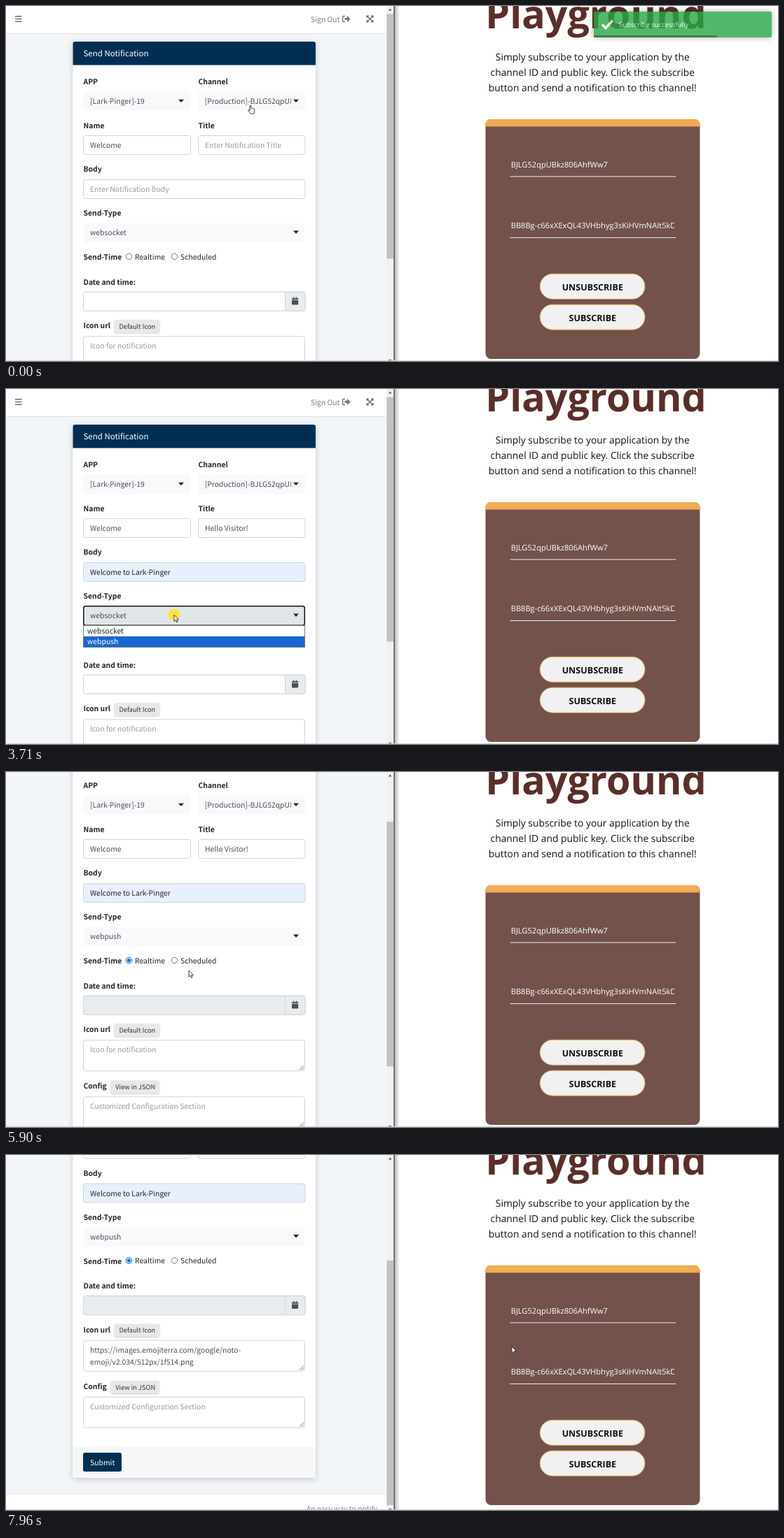
Recreate the animation shown at these times as an HTML page. Size 1102 by 508 pixels, loop 8 s.

```html
<!DOCTYPE html>
<html lang="en">
<head>
<meta charset="utf-8">
<title>Notification form</title>
<style>
  html, body { margin: 0; width: 100%; height: 100%; overflow: hidden; background: #fff; }
  svg { display: block; width: 1102px; height: 508px; }
  text {
    font: 10.4px "Noto Sans CJK JP", "Noto Sans CJK SC", "Noto Sans CJK", "Open Sans", sans-serif;
    fill: #495057; text-rendering: geometricPrecision; white-space: pre;
  }
  .label { font-weight: 700; fill: #212529; }
  .plain { fill: #212529; }
  .hint { fill: #939ba2; }
  .nav { fill: #7f7f7f; }
  .title { font-size: 11.5px; fill: #fff; }
  .white { fill: #fff; }
  .small { font-size: 9.25px; fill: #333; }
  .open, .item, .key, .head, .button, .toast { font-family: "Open Sans", "Noto Sans", sans-serif; }
  .open { font-size: 13.85px; fill: #111; text-anchor: middle; }
  .item { font-size: 9.55px; fill: #333; }
  .key { font-size: 11.1px; font-weight: 500; fill: #fff; }
  .head { font-size: 55.6px; font-weight: 700; fill: #5a2e2a; text-anchor: middle; }
  .button { font-size: 12.55px; font-weight: 700; fill: #111; text-anchor: middle; }
  .toast { font-size: 9.6px; fill: #fff; }
</style>
</head>
<body>
<svg id="stage" viewBox="0 0 1102 508" xmlns="http://www.w3.org/2000/svg"></svg>
<script>
const LOOP = 8000;
const BRAND = 'Lark-Pinger';
const GREETING = `Welcome to ${BRAND}`;
const $ = id => document.getElementById(id);

// Markup helpers
const text = (x, y, str, cls = '', extra = '') =>
  `<text x="${x}" y="${y}" class="${cls}" ${extra}>${str}</text>`;
const rect = (x, y, w, h, fill, extra = '') =>
  `<rect x="${x}" y="${y}" width="${w}" height="${h}" fill="${fill}" ${extra}/>`;
const line = (d, stroke, width = 1, extra = '') =>
  `<path d="${d}" fill="none" stroke="${stroke}" stroke-width="${width}" ${extra}/>`;
const shape = (d, fill, extra = '') => `<path d="${d}" fill="${fill}" ${extra}/>`;
const group = (id, body, extra = '') => `<g id="${id}" ${extra}>${body}</g>`;
const field = (x, y, w, h = 27, extra = '') =>
  rect(x + .5, y + .5, w - 1, h, '#fff', `stroke="#ced4da" rx="3" ${extra}`);
const select = (x, y, w, extra = '') => rect(x, y, w, 27.5, '#f8f9fa', `rx="3" ${extra}`);
const caret = (x, y) => shape(`M${x} ${y}h8l-4 4.3z`, '#212529');
const radio = x => `<circle cx="${x}" cy="358.5" r="4.2" fill="#fff" stroke="#767676"/>`;
const chip = (x, y, w, str) =>
  rect(x, y, w, 18, '#e8e8e8', 'rx="2" filter="url(#soft)"') + text(x + 6.7, y + 12.6, str, 'small');
const textarea = y => field(110, y, 317, 44) +
  line(`M419 ${y + 43}l6 -6M422.5 ${y + 43}l2.5 -2.5`, '#555', .9);

const icons = group('icons',
  line('M13 14.8h9.5M13 18.5h9.5M13 22.2h9.5', '#6f6f6f', 1.5) +
  line('M484 14.4h-2.4q-1 0-1 1v6q0 1 1 1h2.4', '#777', 1.5) +
  shape('M483.5 16.8h3.5v-3l4.6 4.6-4.6 4.6v-3h-3.5z', '#777') +
  line('M516 15l7 7M523 15l-7 7', '#666', 1.4) +
  shape('M514.5 13.5h4l-4 4zM524.5 13.5h-4l4 4zM514.5 23.5h4l-4-4zM524.5 23.5h-4l4-4z', '#666'));

const calendar = shape('M408 418.2h2v-1.6h1.4v1.6h2.4v-1.6h1.4v1.6h2v2h-9.2z' +
  'M408 421h9.2v5.4q0 1-1 1h-7.2q-1 0-1-1z', '#495057');

const form =
  rect(0, 0, 543, 39, '#fff') + line('M0 39.5H543', '#dee2e6') + icons +
  text(435, 22.6, 'Sign Out', 'nav') +
  rect(95.5, 51, 346.5, 618.5, '#fff', 'rx="3" filter="url(#cardShadow)"') +
  shape('M95.5 84.5V54q0-3 3-3H439q3 0 3 3V84.5z', '#002f54') +
  text(110.5, 71.6, 'Send Notification', 'title') +
  text(110.5, 112, 'APP', 'label') + text(274.5, 112, 'Channel', 'label') +
  select(110, 122.3, 153) + text(120, 140, `[${BRAND}]-19`) + caret(246, 133.7) +
  select(274, 122.3, 153) +
  text(283.7, 140, '[Production]-BJLG52qpUBkz', '', 'clip-path="url(#channelClip)"') + caret(410, 133.7) +
  text(110.5, 174.6, 'Name', 'label') + text(274.5, 174.6, 'Title', 'label') +
  field(110, 185, 154) + text(120, 203, 'Welcome') +
  field(274, 185, 153.5, 27, 'id="titleBox"') + text(284, 203, '', '', 'id="titleText"') +
  line('M284.5 192v14', '#222', .9, 'id="titleCaret"') +
  text(110.5, 237.4, 'Body', 'label') +
  field(110, 248, 317.5, 27, 'id="bodyBox"') + text(120, 266, '', '', 'id="bodyText"') +
  line('M120.5 255v14', '#222', .9, 'id="bodyCaret"') +
  text(110.5, 300, 'Send-Type', 'label') +
  select(110.8, 310.8, 315.5, 'id="typeBox"') +
  text(120, 328.4, '', '', 'id="typeText"') + caret(410, 321.6) +
  text(110.5, 363.2, 'Send-Time', 'label') + radio(175.5) + radio(240.5) +
  group('picked', '<circle cx="175.5" cy="358.5" r="4.2" fill="#fff" stroke="#0b72d0"/>' +
    '<circle cx="175.5" cy="358.5" r="2.6" fill="#0b72d0"/>') +
  text(184, 362.6, 'Realtime', 'plain') + text(249, 362.6, 'Scheduled', 'plain') +
  text(110.5, 398.6, 'Date and time:', 'label') +
  field(110, 408.7, 317.5) + rect(398.5, 409.2, 28.5, 27, '#e9ecef', 'stroke="#ced4da" rx="2"') +
  rect(110.5, 409.2, 288, 27, '#fff', 'id="dateBox" stroke="#ced4da" rx="2"') + calendar +
  text(110.5, 461, 'Icon url', 'label') + chip(154.7, 449.2, 64.3, 'Default Icon') +
  textarea(472.3) + text(120, 490.3, '', '', 'id="iconText"') + text(120, 507.8, '', '', 'id="iconMore"') +
  text(110.5, 542, 'Config', 'label') + chip(149.6, 530.5, 69, 'View in JSON') +
  textarea(553.3) + text(120, 571.3, 'Customized Configuration Section', 'hint') +
  shape('M95.5 625H442V666.5q0 3-3 3H98.5q-3 0-3-3z', '#f6f7f7') +
  rect(110, 633.5, 55, 27, '#002f54', 'rx="3"') + text(120, 651.4, 'Submit', 'white') +
  rect(0, 692.5, 543, 60, '#fff') + line('M0 692.5H543', '#dee2e6') +
  text(429, 717.6, 'An easy way to notify', 'nav');

const suggestions = ['Test Body', GREETING, 'Test Web Push Body', 'Hello World', 'Hello', 'hello'];
const bodyMenu = group('bodyMenu',
  rect(181.5, 281.5, 132.5, 164.5, '#fff', 'rx="2" filter="url(#menuShadow)"') +
  shape('M191.5 282l6.5-6 6.5 6z', '#fff') + line('M191.5 281.5l6.5-6 6.5 6', '#ddd', .8) +
  rect(182, 310.5, 131.5, 26.2, '#ececec', 'id="hovered"') +
  suggestions.map((s, i) => text(190.7, 301 + 26.2 * i, s, 'item')).join(''));
const typeMenu = group('typeMenu',
  rect(110.5, 338.5, 316, 31, '#fff', 'stroke="#767676"') + rect(111, 354, 315, 15, '#1967d2') +
  text(116, 350, 'websocket', 'plain') + text(116, 365.3, 'webpush', 'white'));

const pill = (y, str) =>
  rect(762.2, y, 149.8, 36, '#f1f1f1', 'rx="18" stroke="#e9a84c"') + text(837.3, y + 23.6, str, 'button');
const playground =
  text(842, 32, 'Playground', 'head') +
  text(837.3, 78, 'Simply subscribe to your application by the', 'open') +
  text(837.3, 100, 'channel ID and public key. Click the subscribe', 'open') +
  text(837.3, 122, 'button and send a notification to this channel!', 'open') +
  rect(684.5, 162, 306, 343, '#72524b', 'rx="8"') +
  shape('M684.5 172.5V170q0-8 8-8H982.5q8 0 8 8V172.5z', '#f0ab54') +
  text(720.7, 230.5, 'BJLG52qpUBkz806AhfWw7', 'key') +
  text(720.7, 318, 'BB8Bg-c66xXExQL43VHbhyg3sKiHVmNAIt5kD', 'key', 'clip-path="url(#keyClip)"') +
  line('M719.5 244H956M719.5 331.5H956', '#f3eeec') +
  pill(383.3, 'UNSUBSCRIBE') + pill(427.2, 'SUBSCRIBE');

const toast = group('toast',
  rect(839, 8, 254, 37, '#28a745', 'rx="2" filter="url(#glow)"') +
  rect(839, 42, 176, 3, '#000', 'id="progress" opacity=".45"') +
  line('M851 26.5l5 5.2 10-11', '#fff', 3.4) + text(875, 30.4, 'Subscribe successfully', 'toast'));

const outline = 'stroke="#111" stroke-width=".8" stroke-linejoin="round"';
const pointer = group('pointer',
  '<circle id="press" r="8.5" fill="#ffe528" opacity=".9"/>' +
  group('arrow', shape('M0 0V9.2L2.1 7.3 3.6 10.5 5 9.9 3.6 6.8H6.4z', '#fff', outline)) +
  group('hand', shape('M-.9 .8q.9-1.6 1.8 0V4.2q1-.6 1.7.2 1-.5 1.6.4 1.2-.3 1.5.9V8.6L4.8 12.3H.4L-3 7.8q-.6-1.4.6-1.5L-.9 7.6z', '#fff', outline)) +
  group('beam', line('M-2.7-6H2.7M-2.7 6H2.7M0-6V6', '#333', 1.2)));

const filter = (id, dy, blur, alpha) =>
  `<filter id="${id}" x="-20%" y="-20%" width="140%" height="140%">
     <feDropShadow dx="0" dy="${dy}" stdDeviation="${blur}" flood-opacity="${alpha}"/></filter>`;
const clip = (id, x, y, w, h) => `<clipPath id="${id}">${rect(x, y, w, h, '#000')}</clipPath>`;

$('stage').innerHTML = `<defs>
    ${filter('soft', 1, 1, .25)}${filter('cardShadow', 2, 4, .2)}${filter('menuShadow', 1, 2.5, .3)}${filter('glow', 0, 4, .4)}
    ${clip('channelClip', 275, 122, 131.7, 28)}${clip('keyClip', 719, 300, 235, 30)}${clip('pageClip', 0, 0, 543, 508)}
    <linearGradient id="edge"><stop stop-color="#bbb"/><stop offset="1" stop-color="#fff"/></linearGradient>
  </defs>` +
  rect(0, 0, 1102, 508, '#fff') + rect(0, 0, 543, 508, '#f3f6f9') +
  `<g clip-path="url(#pageClip)">${group('page', form)}</g>` + bodyMenu + typeMenu +
  rect(543, 0, 10.5, 508, '#f1f1f1') + rect(543.5, 11.5, 9.5, 350, '#c1c1c1', 'id="thumb"') +
  shape('M546 6.5l2.3-3 2.3 3zM546 506l2.3 2.5 2.3-2.5z', '#555') +
  rect(555, 0, 7, 508, 'url(#edge)') + rect(553.4, 0, 1.6, 508, '#555') +
  group('right', playground) + line('M0 507.5H1102', '#d4d4d4') + toast + pointer;

// Timelines: [ms, values...]
const path = [
  [0, 349, 142], [70, 349, 142], [600, 320, 195], [1470, 320, 195], [1670, 171, 258],
  [3180, 171, 258], [3400, 240, 322], [3900, 240, 324], [4250, 240, 361], [4470, 238, 371],
  [4540, 236, 371], [4730, 173, 370], [4950, 173, 370], [5080, 175, 358], [5250, 175, 358],
  [5690, 261, 284], [6200, 261, 284], [6530, 200, 316], [7130, 200, 316],
  [7450, 138, 438], [7560, 138, 438], [7890, 722, 274]];
const pageScroll = [[0, 0], [5740, 0], [5890, 89], [6180, 89], [6420, 146], [7130, 146], [7400, 207.5]];
const cursors = [[0, 'hand'], [300, 'arrow'], [480, 'beam'], [3250, 'arrow'], [6590, 'hand'],
  [7200, 'arrow'], [7400, 'hand'], [7620, 'arrow']];
const presses = [[650, 800], [2950, 3200], [3400, 3480], [3640, 3720], [4380, 4460],
  [5080, 5200], [6800, 6900], [7470, 7550]];

const within = (t, from, to) => t >= from && t < to;
const held = (table, t) => table.filter(k => k[0] <= t).pop()[1];
function tween(table, t) {
  const i = table.findIndex(k => k[0] > t);
  if (i < 0) return table[table.length - 1].slice(1);
  const [a, b] = [table[i - 1], table[i]];
  const p = (t - a[0]) / (b[0] - a[0]);
  return a.slice(1).map((v, n) => v + (b[n + 1] - v) * p);
}
const set = (id, attr, value) => $(id).setAttribute(attr, value);
const show = (id, on) => set(id, 'visibility', on ? 'visible' : 'hidden');
function write(id, str, cls = '') {
  if ($(id).textContent !== str) $(id).textContent = str;
  set(id, 'class', cls);
}

function render(t) {
  const [scroll] = tween(pageScroll, t);
  set('page', 'transform', `translate(0 ${-scroll})`);
  set('thumb', 'y', 11.5 + scroll * .672);
  set('right', 'transform', `translate(0 ${t >= 7960 ? -4 : 0})`);

  set('progress', 'width', 176 * Math.max(0, 1 - t / 950));
  set('toast', 'opacity', .8 * Math.min(1, Math.max(0, (1400 - t) / 450)));

  const typed = t >= 2200;
  write('titleText', !typed ? 'Enter Notification Title' : t < 2880 ? 'Hello Visitor' : 'Hello Visitor!', typed ? '' : 'hint');
  set('titleBox', 'stroke', within(t, 700, 3170) ? '#8fc4fb' : '#ced4da');
  show('titleCaret', within(t, 700, 1740) || within(t, 2200, 2680));
  set('titleCaret', 'transform', `translate(${typed ? 58.2 : 0} 0)`);

  const filled = t >= 3400;
  write('bodyText', filled ? GREETING : 'Enter Notification Body', filled ? 'plain' : 'hint');
  set('bodyBox', 'fill', filled ? '#e8f0fe' : '#fff');
  set('bodyBox', 'stroke', within(t, 2950, 3560) ? '#a5cff9' : '#ced4da');
  show('bodyCaret', within(t, 2950, 3400));
  show('bodyMenu', within(t, 3020, 3500));
  show('hovered', within(t, 3330, 3500));

  const focused = within(t, 3640, 5100);
  write('typeText', t < 4400 ? 'websocket' : 'webpush', '');
  set('typeBox', 'fill', focused ? '#e2e6ea' : '#f8f9fa');
  set('typeBox', 'stroke', focused ? '#111' : 'none');
  set('typeBox', 'stroke-width', 1.5);
  show('typeMenu', within(t, 3710, 4400));

  const realtime = t >= 5120;
  show('picked', realtime);
  set('dateBox', 'fill', realtime ? '#e9ecef' : '#fff');

  const hasIcon = t >= 6860;
  write('iconText', hasIcon ? 'https://images.emojiterra.com/google/noto-' : 'Icon for notification', hasIcon ? '' : 'hint');
  write('iconMore', hasIcon ? 'emoji/v2.034/512px/1f514.png' : '');

  set('pointer', 'transform', `translate(${tween(path, t).join(' ')})`);
  const kind = held(cursors, t);
  for (const id of ['hand', 'arrow', 'beam']) show(id, id === kind);
  show('press', presses.some(([from, to]) => within(t, from, to)));
}

const start = performance.now();
function tick() {
  render((performance.now() - start) % LOOP);
  requestAnimationFrame(tick);
}
tick();
</script>
</body>
</html>
```
